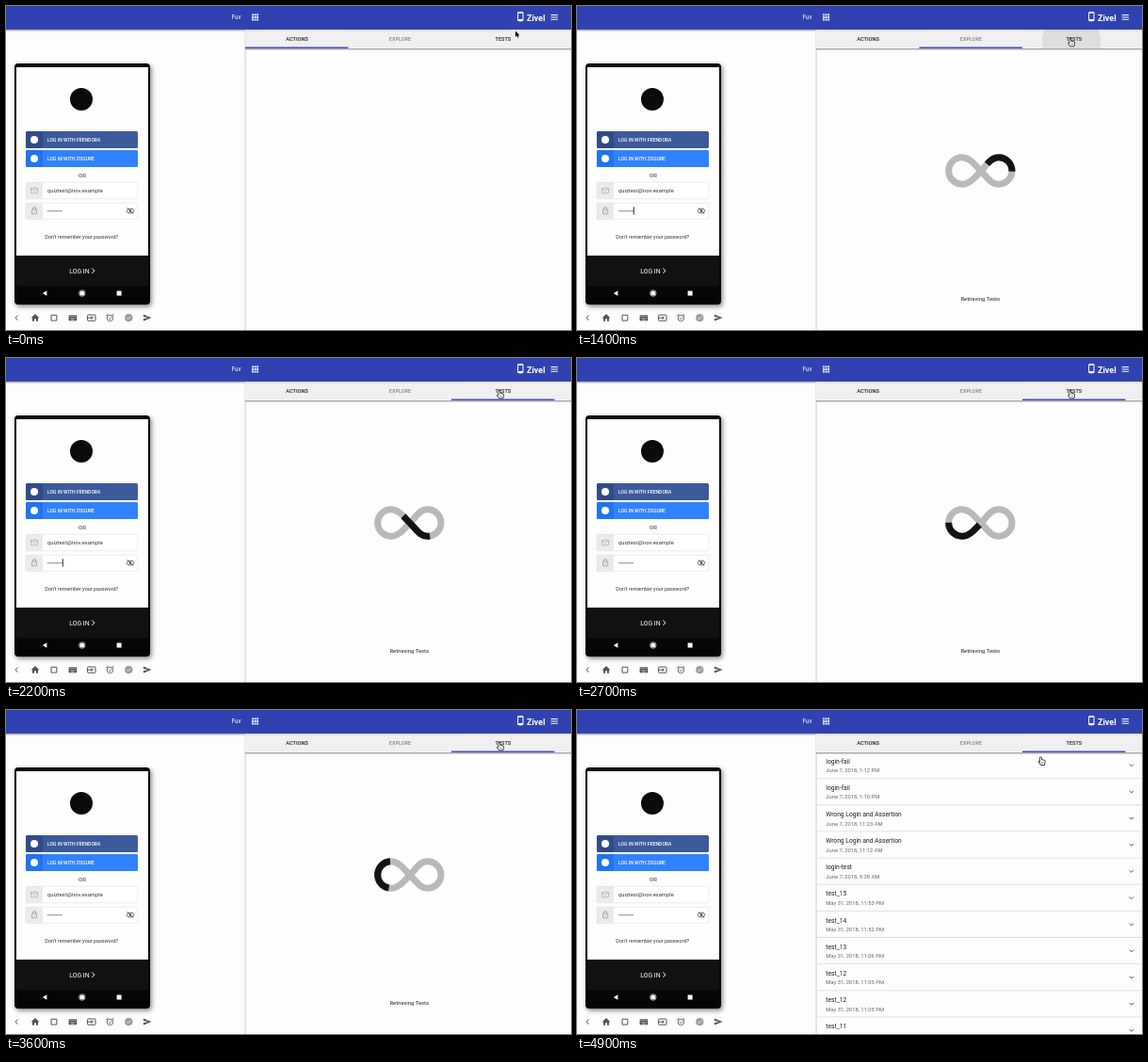
Animation of 600x344 px, one loop 5 s. Source, as an HTML page with a canvas:

```html
<!DOCTYPE html>
<html lang="en">
<head>
<meta charset="utf-8">
<title>Device test panel</title>
<style>
html, body { margin: 0; width: 100%; height: 100%; overflow: hidden; background: #fdfdfd; }
canvas { display: block; width: 100vw; height: 100vh; }
</style>
</head>
<body>
<canvas id="stage"></canvas>
<script>
const W = 600, H = 344, LOOP = 5000, STEP = 100;
const CLICK = 1300, LOADED = 4600;
const canvas = document.getElementById('stage');
const c = canvas.getContext('2d');
const dpr = window.devicePixelRatio || 1;
canvas.width = W * dpr;
canvas.height = H * dpr;

const INDIGO = '#3042b0', DARK = '#212121', ICON = '#555';

// Linear interpolation through [time, value] points
function track(t, points) {
  if (t <= points[0][0]) return points[0][1];
  for (let i = 1; i < points.length; i++) {
    const [t0, a] = points[i - 1], [t1, b] = points[i];
    if (t <= t1) return a + (b - a) * (t - t0) / (t1 - t0);
  }
  return points[points.length - 1][1];
}

function rect(x, y, w, h, color, r = 0) {
  c.fillStyle = color;
  c.beginPath();
  if (r) c.roundRect(x, y, w, h, r); else c.rect(x, y, w, h);
  c.fill();
}

function box(x, y, w, h, color, width = 1, r = 0) {
  c.strokeStyle = color;
  c.lineWidth = width;
  c.beginPath();
  c.roundRect(x, y, w, h, r);
  c.stroke();
}

function disc(x, y, r, color) {
  c.fillStyle = color;
  c.beginPath();
  c.arc(x, y, r, 0, Math.PI * 2);
  c.fill();
}

function ring(x, y, r, color, width) {
  c.strokeStyle = color;
  c.lineWidth = width;
  c.beginPath();
  c.arc(x, y, r, 0, Math.PI * 2);
  c.stroke();
}

function line(color, width, ...xy) {
  c.strokeStyle = color;
  c.lineWidth = width;
  c.beginPath();
  for (let i = 0; i < xy.length; i += 2) c.lineTo(xy[i], xy[i + 1]);
  c.stroke();
}

function poly(color, ...xy) {
  c.fillStyle = color;
  c.beginPath();
  for (let i = 0; i < xy.length; i += 2) c.lineTo(xy[i], xy[i + 1]);
  c.fill();
}

function text(str, x, y, size, color, { weight = 400, align = 'left' } = {}) {
  c.font = `${weight} ${size}px Roboto, sans-serif`;
  c.textAlign = align;
  c.textBaseline = 'alphabetic';
  c.fillStyle = color;
  c.fillText(str, x, y);
}

function shade(x, y, w, h, alpha) {
  const g = c.createLinearGradient(0, y, 0, y + h);
  g.addColorStop(0, `rgba(0,0,0,${alpha})`);
  g.addColorStop(1, 'rgba(0,0,0,0)');
  rect(x, y, w, h, g);
}

function header() {
  rect(0, 0, W, 25, INDIGO);
  text('Fuv', 249.5, 14.2, 6.4, '#fff', { align: 'right' });
  for (let i = 0; i < 9; i++) {
    rect(261 + (i % 3) * 2.6, 8.4 + Math.floor(i / 3) * 2.6, 1.9, 1.9, '#fff');
  }
  box(543.6, 6.6, 5.4, 9.2, '#fff', 1, 1);
  rect(543.5, 6.2, 5.6, 1.6, '#fff');
  rect(543.5, 14, 5.6, 2, '#fff');
  text('Zivel', 553, 15.6, 9, '#fff', { weight: 700 });
  for (const y of [9, 11.4, 13.8]) rect(578.6, y, 7.4, 1, '#fff');
}

function formField(y, h) {
  rect(21, y, 119, h, '#fff');
  rect(21, y, 18, h, '#ebebeb');
  box(21.3, y + 0.3, 118.4, h - 0.6, '#e6e6e6', 0.7, 1);
}

function loginButton(y, color, side, label) {
  rect(21, y, 119, 18, color, 1.5);
  rect(21, y, 18, 18, side, 1.5);
  disc(30, y + 9, 4, '#fff');
  text(label, 44, y + 10.9, 5.05, '#fff', { weight: 500 });
}

function phone(caret) {
  c.save();
  c.shadowColor = 'rgba(0,0,0,.5)';
  c.shadowBlur = 5 * dpr;
  c.shadowOffsetX = 1.5 * dpr;
  c.shadowOffsetY = 2 * dpr;
  rect(9, 61, 144, 256, '#060606', 4);
  c.restore();
  rect(11, 65, 140, 200, '#fdfdfd');
  rect(11, 265, 140, 32, '#121013');

  disc(80, 99, 12, '#0b0b0b');
  loginButton(133, '#3b5a99', '#314b86', 'LOG IN WITH FRENDORA');
  loginButton(153, '#3182fb', '#2273ef', 'LOG IN WITH ZOGURE');
  text('OR', 81, 181.9, 6, '#333', { align: 'center' });

  formField(187, 18);
  box(26.5, 193.3, 7, 5.4, '#aaa', 0.7, 0.5);
  line('#aaa', 0.7, 26.7, 193.8, 30, 196.4, 33.3, 193.8);
  text('quiztest@nov.example', 44, 198.2, 5.85, '#333');

  formField(209, 17.5);
  box(27.5, 216, 5.2, 4.8, '#999', 0.8, 0.4);
  c.beginPath();
  c.arc(30.1, 215.2, 1.7, Math.PI, 0);
  c.lineTo(31.8, 216);
  c.moveTo(28.4, 215.2);
  c.lineTo(28.4, 216);
  c.stroke();
  rect(29.6, 217.9, 1, 1, '#999');
  for (let i = 0; i < 8; i++) rect(44.2 + i * 2, 217.2, 1.5, 1.1, '#444', 0.5);
  if (caret) rect(59.8, 213.3, 0.9, 8.2, '#111');
  c.strokeStyle = '#444';
  c.lineWidth = 0.8;
  c.beginPath();
  c.ellipse(132, 217.5, 3.8, 2.4, 0, 0, Math.PI * 2);
  c.stroke();
  disc(132, 217.5, 1.2, '#444');
  line('#444', 0.8, 128.8, 214.2, 135.2, 220.8);

  text('Don\u2019t remember your password?', 80.2, 247.2, 5.43, '#333', { align: 'center' });
  text('LOG IN', 67.2, 283.7, 6.9, '#fff');
  line('#fff', 1, 91.4, 278.5, 93.8, 281.1, 91.4, 283.7);

  poly('#fff', 38.8, 305, 43.4, 302.2, 43.4, 307.8);
  disc(80.8, 305, 2.5, '#fff');
  ring(80.8, 305, 3.3, '#ccc', 0.8);
  rect(117.6, 302.5, 5, 5, '#fff');
}

function toolbar() {
  line(ICON, 0.9, 12.6, 328.4, 10, 331, 12.6, 333.6);
  poly(ICON, 26.6, 331.3, 31, 327, 35.4, 331.3, 34, 331.3, 34, 334.8, 32, 334.8,
    32, 332.2, 30, 332.2, 30, 334.8, 28, 334.8, 28, 331.3);
  box(48, 328.2, 5.8, 5.8, ICON, 1);
  rect(66.6, 328.2, 8.6, 6, ICON, 0.8);
  for (let i = 0; i < 8; i++) {
    rect(67.8 + (i % 4) * 1.8, 329.3 + Math.floor(i / 4) * 1.6, 0.8, 0.8, '#fdfdfd');
  }
  rect(69, 332.7, 3.8, 0.7, '#fdfdfd');
  box(86.6, 328, 8.4, 6.2, ICON, 1, 0.6);
  line(ICON, 1, 85.8, 331.1, 91.6, 331.1);
  poly(ICON, 90.6, 329.2, 92.8, 331.1, 90.6, 333);
  ring(110.4, 331.4, 3.2, ICON, 0.9);
  line(ICON, 0.9, 108.9, 331.5, 110, 332.7, 112, 330.3);
  line(ICON, 1, 106.3, 328.8, 108.4, 327.1);
  line(ICON, 1, 112.4, 327.1, 114.5, 328.8);
  disc(130.3, 331, 4.1, '#999');
  line('#fdfdfd', 0.9, 128.2, 331.1, 129.7, 332.6, 132.5, 329.6);
  poly(ICON, 146, 327.4, 154.6, 331, 146, 334.6, 146, 331.9, 151, 331, 146, 330.1);
}

function tabs(t) {
  rect(254, 25, 346, 20, '#f0f0f0');
  const ripple = track(t, [[CLICK - 1, 0], [1500, 1]]);
  const fade = track(t, [[1700, 1], [2000, 0]]);
  if (ripple * fade > 0) {
    c.save();
    c.beginPath();
    c.rect(473, 25, 109.4, 20);
    c.clip();
    disc(525, 37, ripple * 62, `rgba(0,0,0,${0.075 * fade})`);
    c.restore();
  }
  shade(254, 25, 346, 2, 0.12);
  shade(254, 45, 346, 2.5, 0.4);
  const mid = { weight: 500, align: 'center' };
  text('ACTIONS', 309, 37, 5.65, DARK, mid);
  text('EXPLORE', 418.5, 37, 5.5, '#858585', mid);
  text('TESTS', 527.8, 37, 5.5, DARK, mid);
  rect(track(t, [[CLICK, 254], [1500, 473]]), 43.5, 109.4, 1.6, '#4150bd');
}

const LOOP_LENGTH = 242.78;
const infinity = new Path2D('M93.9 46.4c9.3 9.5 13.8 17.9 23.5 17.9s17.5-7.8 17.5-17.5' +
  's-7.8-17.6-17.5-17.5c-9.7.1-13.3 7.2-22.1 17.1c-8.9 8.8-15.7 17.9-25.4 17.9' +
  's-17.5-7.8-17.5-17.5s7.8-17.5 17.5-17.5S86.2 38.6 93.9 46.4z');

function loader(t) {
  const turn = track(t, [[1400, 0.33], [1600, 0.505], [2200, 1.02], [3200, 2.18], [4400, 3.79], [4600, 4.06]]);
  const len = track(t, [[1600, 46], [2200, 57], [3200, 54], [4400, 44]]);
  c.save();
  c.translate(428.3, 175);
  c.scale(0.815, 0.815);
  c.translate(-93.65, -46.8);
  c.lineWidth = 8.6;
  c.strokeStyle = '#b9b9b9';
  c.stroke(infinity);
  c.setLineDash([len, LOOP_LENGTH - len]);
  c.lineDashOffset = len / 2 - (turn % 1) * LOOP_LENGTH;
  c.strokeStyle = '#141414';
  c.stroke(infinity);
  c.restore();
  text('Retrieving Tests', 428.2, 313, 5.85, DARK, { align: 'center' });
}

const JUNE = 'June 7, 2018, ', MAY = 'May 31, 2018, ';
const tests = [
  ['login-fail', JUNE + '1:12 PM'],
  ['login-fail', JUNE + '1:10 PM'],
  ['Wrong Login and Assertion', JUNE + '11:23 AM'],
  ['Wrong Login and Assertion', JUNE + '11:12 AM'],
  ['login-test', JUNE + '9:38 AM'],
  ['test_15', MAY + '11:53 PM'],
  ['test_14', MAY + '11:52 PM'],
  ['test_13', MAY + '11:06 PM'],
  ['test_12', MAY + '11:05 PM'],
  ['test_12', MAY + '11:05 PM'],
  ['test_11', MAY + '11:04 PM']
];

function list() {
  tests.forEach(([name, date], i) => {
    const y = i * 28.15;
    text(name, 264.3, y + 56.7, 6.7, DARK);
    text(date, 264.3, y + 66.2, 5.8, '#666');
    line('#555', 1, 586.6, y + 57.6, 588.8, y + 59.8, 591, y + 57.6);
    rect(255, y + 72.2, 345, 0.8, '#dcdcdc');
  });
}

function outlined(path) {
  c.lineJoin = 'round';
  c.stroke(path);
  c.fill(path);
}

const arrow = new Path2D('M0 0V6.4L1.5 5.1L2.5 7.3L3.6 6.8L2.6 4.7H4.5Z');
const hand = new Path2D('M1.5 .6Q2.1-.1 2.6 .6V3L5.6 3.6Q6.5 3.9 6.3 5L5.7 8H2.4L.2 5.3Q0 4.4 1.5 5.1Z');

function cursor(t) {
  const x = track(t, [[0, 541], [600, 523.4], [1000, 523.4], [1300, 521.8], [4400, 521.8], [4900, 490.5]]);
  const y = track(t, [[0, 26.5], [600, 33], [1000, 33], [1300, 34.6], [4400, 34.6], [4900, 50]]);
  c.save();
  c.translate(x, y);
  if (t < 300) {
    c.strokeStyle = '#fff';
    c.fillStyle = '#000';
    c.lineWidth = 0.8;
    outlined(arrow);
  } else {
    c.strokeStyle = '#111';
    c.fillStyle = '#fff';
    c.lineWidth = 1.5;
    outlined(hand);
    c.lineWidth = 0.5;
    for (const k of [3.2, 4.4]) line('#333', 0.5, k, 5, k, 6.8);
  }
  c.restore();
}

function draw(t) {
  c.setTransform(canvas.width / W, 0, 0, canvas.height / H, 0, 0);
  rect(0, 0, W, H, '#fdfdfd');
  header();
  shade(0, 25, 254, 2.5, 0.35);
  phone(t >= 100 && t < 4000 && t % 1000 < 500);
  toolbar();
  if (t >= LOADED) list();
  else if (t >= 1400) loader(t);
  rect(253.6, 25, 0.9, H - 25, '#c9c9c9');
  tabs(t);
  cursor(t);
}

function tick(now) {
  draw(Math.floor((now % LOOP) / STEP) * STEP);
  requestAnimationFrame(tick);
}
requestAnimationFrame(tick);
</script>
</body>
</html>
```
